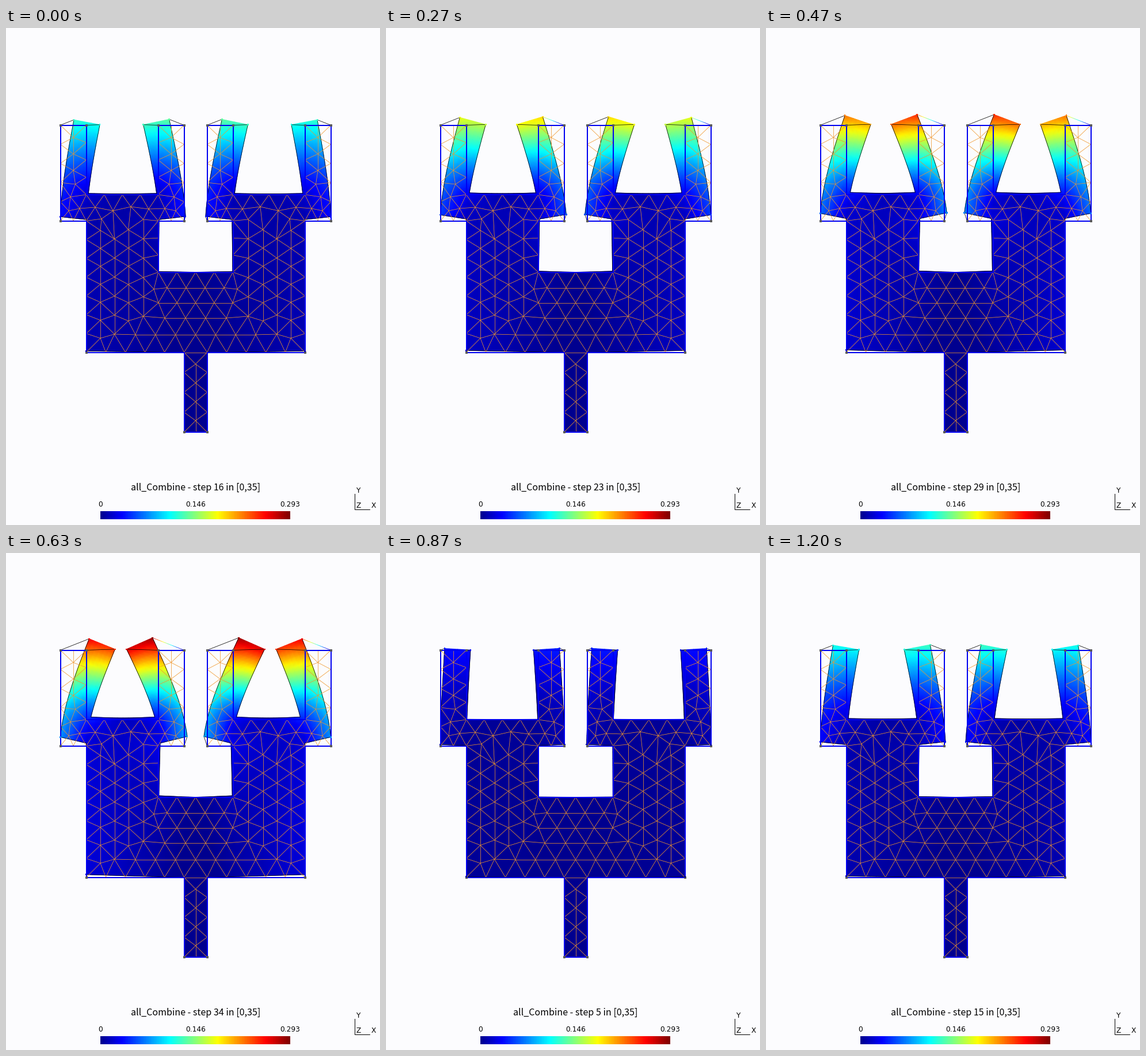
Write a matplotlib script that moves like this. It is 650 by 862 pixels and loops after 1.23 s.

```python
import numpy as np
import matplotlib.pyplot as plt
from matplotlib.animation import FuncAnimation
from matplotlib.collections import LineCollection
from matplotlib.colors import ListedColormap
from matplotlib.tri import Triangulation

W, H, DPI = 650, 862, 64
PX = 72 / DPI                      # points per pixel
MID = 329.5                        # symmetry axis
XA, XB, XC, XD = 94.5, 139.5, 264.5, 309.5
TOP, CROTCH, FOOT, HOLE, FLOOR, END = 168.5, 289, 334.5, 423.5, 562.5, 701
STEPS = 36
HAIR = .75 * PX                    # thin line width

# Left half of the contour, split at the tips of the prongs
PIECES = [
    [(XD, FLOOR), (XB, FLOOR), (XB, FOOT), (XA, FOOT), (XA, TOP)],
    [(XB, TOP), (XB, CROTCH), (XC, CROTCH), (XC, TOP)],
    [(XD, TOP), (XD, FOOT), (XC, FOOT), (XC, HOLE), (MID, HOLE)],
]
# Blocks of the left half: x0, x1, y0, y1, columns, rows
BLOCKS = [
    (XA, XB, TOP, FOOT, 6, 22),
    (XC, XD, TOP, FOOT, 6, 22),
    (XB, XC, CROTCH, FLOOR, 12, 24),
    (XC, MID, HOLE, FLOOR, 5, 8),
    (XD, MID, FLOOR, END, 1, 4),
]


def rainbow_map():
    """Piecewise linear dark blue, blue, cyan, yellow, red, dark red."""
    v = np.linspace(1 / 64, 1, 256)
    ramps = [1.5 - np.abs(4 * v - c) for c in (3, 2, 1)]
    return ListedColormap(np.clip(np.column_stack(ramps), 0, 1))


def mirror(pts, axis=MID):
    pts = np.array(pts, float)
    pts[..., 0] = 2 * axis - pts[..., 0]
    return pts


def both(pts):
    return np.vstack([np.array(pts, float), mirror(pts)])


def field(pts):
    """Displacement in pixels per load step."""
    x, y = np.asarray(pts, float).T
    side = np.where(x <= MID, 1, -1)
    x = np.where(x <= MID, x, 2 * MID - x)
    h = FOOT - y
    k = np.clip(h, 0, 166)
    bend = .1057 * k + .00176 * k**2 - 3.51e-6 * k**3
    turn = .233 + .167 * k / 166
    lift = 4.8 * (1 - .65 * (k / 166)**2)
    s = np.clip((x - XB) / (XC - XB), 0, 1)
    left = np.clip(XB - x, 0, None)
    right = np.clip(x - XC, 0, None) * (h >= 0)
    ux = (1 - s) * bend + s * (3.5 - 1.17 * bend)
    ux = ux + .045 * right * np.clip(1 - k / 100, 0, 1)
    uy = -lift * (1 - .35 * np.sin(np.pi * s)) - turn * (left + 1.1 * right)
    # the body settles towards the clamped stem
    q = 1 - np.clip(-h / (FLOOR - FOOT), 0, 1)
    fade = np.where(h >= 0, 1, np.clip((MID - x) / (MID - XC), 0, 1))
    edge = -4.8 * np.clip((XD - x) / 170, 0, 1)**1.1
    ux = ux * q**2 * fade
    uy = edge + (uy - edge) * q**2 * fade
    return np.column_stack([side * ux, uy]) / 34


def fill_grid():
    pts, tris, start = [], [], 0
    for x0, x1, y0, y1, nx, ny in BLOCKS:
        gx, gy = np.meshgrid(np.linspace(x0, x1, nx + 1),
                             np.linspace(y0, y1, ny + 1))
        block = np.column_stack([gx.ravel(), gy.ravel()])
        ids = np.arange(len(block)).reshape(ny + 1, nx + 1)
        a, b, c, d = (i.ravel() for i in (ids[:-1, :-1], ids[:-1, 1:],
                                          ids[1:, 1:], ids[1:, :-1]))
        cells = np.vstack([np.column_stack([a, b, c]),
                           np.column_stack([a, c, d])])
        for part in (block, mirror(block)):
            pts.append(part)
            tris.append(cells + start)
            start += len(part)
    return np.vstack(pts), np.vstack(tris)


def column(x, y0, y1, n):
    return [(x, y) for y in np.linspace(y0, y1, n)]


def row(y, x0, x1, n):
    return [(x, y) for x in np.linspace(x0, x1, n)]


def mesh_edges():
    prong = (column(XA, TOP, FOOT, 6) + column(XB, TOP, CROTCH, 5)
             + column(117, 190, 247, 3)
             + [(117, TOP), (117, FOOT), (XB, FOOT), (120.5, 271),
                (112, 293), (109, 317), (128, 313)])
    body = (row(CROTCH, XB, XC, 5) + row(FLOOR, XB, XD, 6)
            + [(155, 311), (186, 317), (217, 310), (248, 314), (166, 331)]
            + column(XB, FOOT, FLOOR, 8) + column(164, 351, 538, 7)
            + column(188.5, 366, 531, 6) + column(212.5, 350, 508, 6)
            + column(238.5, 332, 500, 6) + column(XC, FOOT, HOLE, 4)
            + row(HOLE, XC, MID, 3) + [(257, 453)] + row(450.5, 280, 313, 2)
            + row(476.5, 265, MID, 3) + row(503, 276, 312, 2)
            + row(532, 225, MID, 4))
    stem = column(XD, FLOOR, END, 5) + column(MID, 583, 681, 4)
    stem += [(MID, END)]
    half = np.vstack([prong, mirror(prong, (XB + XC) / 2), body, stem])
    pts = np.unique(both(half), axis=0)
    tri = Triangulation(*pts.T)
    cx, cy = pts[tri.triangles].mean(axis=1).T
    cx = np.minimum(cx, 2 * MID - cx)
    inside = np.zeros(len(cx), bool)
    for x0, x1, y0, y1, _, _ in BLOCKS:
        inside |= (cx >= x0) & (cx <= x1) & (cy >= y0) & (cy <= y1)
    tri.set_mask(~inside)
    return pts[tri.edges]


def densify(corners, n=14):
    c = np.array(corners, float)
    t = np.linspace(0, 1, n)[:, None]
    return np.vstack([a + (b - a) * t for a, b in zip(c[:-1], c[1:])])


# Load step shown at each time
CHANGES = np.array([70 + 10 * round(10 * k / 3) for k in range(16)]
                   + [600 + 10 * round(10 * k / 3) for k in range(19)])


def step_at(ms):
    return int(16 + np.sum(CHANGES <= ms)) % STEPS


fig = plt.figure(figsize=(W / DPI, H / DPI), dpi=DPI, facecolor="#fcfcfe")
ax = fig.add_axes([0, 0, 1, 1])
ax.axis("off")
jet = rainbow_map()

# Deformed solution
nodes, cells = fill_grid()
shift = field(nodes)
size = np.hypot(*shift.T)
peak = size.max() * (STEPS - 1)
tri = Triangulation(*nodes.T, cells)
fill = ax.tripcolor(tri, size * 0, shading="gouraud", cmap=jet,
                    vmin=0, vmax=1, zorder=1)

# Deformed border, with links from each corner to its rest position
borders = [densify(p) for p in PIECES]
borders += [mirror(b) for b in borders]
border_shift = [field(b) for b in borders]
corners = both([(XB, TOP), (XC, TOP), (XA, FOOT), (XD, FOOT), (XB, FLOOR),
                (XA, TOP), (XD, TOP)])
corner_shift = field(corners)
corner_size = np.hypot(*corner_shift.T) / peak
shaded = [6, 12]                   # outer tips of the right-hand prongs
black = LineCollection([], colors="black", linewidths=HAIR, zorder=2)
rainbow = LineCollection([], linewidths=HAIR, zorder=2)
ax.add_collection(black)
ax.add_collection(rainbow)
dots = ax.scatter(*corners.T, c=corner_size, s=(2.6 * PX)**2, marker="s",
                  cmap=jet, vmin=0, vmax=1, linewidths=0, zorder=6)

# Mesh and contour at rest
ax.add_collection(LineCollection(mesh_edges(), colors="#f0962d",
                                 linewidths=HAIR, zorder=3))
left = [(XD, END)] + sum(PIECES, [])
shape = np.vstack([left, mirror(left[::-1]), left[:1]])
ax.plot(*shape.T, color="#0000f0", lw=2 * PX, aa=False, zorder=4,
        solid_joinstyle="miter")
marks = both([(XA, TOP), (XB, TOP), (XC, TOP), (XD, TOP), (XA, FOOT),
              (XD, FOOT), (XB, FLOOR), (XD, END)])
ax.scatter(*marks.T, s=(4 * PX)**2, marker="s", color="#5a5a5a",
           linewidths=0, zorder=5)

# Colour scale, title and axes
ax.imshow(np.linspace(0, 1, 256)[None], cmap=jet, aspect="auto",
          extent=(164, 493.5, 852, 838))


def label(x, y, text, px=12.2, font="DejaVu Sans"):
    return ax.text(x, y, text, fontsize=px * PX, family=font, color="black",
                   ha="center", va="baseline")


title = label(329.3, 802, "", 16, "Noto Sans CJK JP")
for x, text in ((164.5, "0"), (329.3, "0.146"), (493.7, "0.293")):
    label(x, 829.5, text)
for x, y, text in ((612, 805.5, "Y"), (612.5, 832, "Z"), (639, 832, "X")):
    label(x, y, text)
ax.plot([605.5, 605.5, 632], [808, 834.5, 834.5], color="black", lw=PX,
        aa=False)
ax.set_xlim(0, W)
ax.set_ylim(H, 0)


def draw(i):
    step = step_at(10 * i)
    tri.x, tri.y = (nodes + shift * step).T
    fill.set_array(size * step / peak)

    moved = corners + corner_shift * step
    dots.set_offsets(moved)
    dots.set_array(corner_size * step)
    coloured = shaded if step >= 20 else []
    lines = [b + u * step for b, u in zip(borders, border_shift)]
    lines += [np.array([corners[j], moved[j]]) for j in range(len(corners))
              if j not in coloured]
    black.set_segments(lines)

    t = np.linspace(0, 1, 17)
    parts, tints = [], []
    for j in coloured:
        path = corners[j] + (moved[j] - corners[j]) * t[:, None]
        parts += [path[n:n + 2] for n in range(16)]
        tints += list(jet(corner_size[j] * step * t[:-1]))
    rainbow.set_segments(parts)
    rainbow.set_color(tints or "black")

    title.set_text(f"all_Combine - step {step} in [0,35]")
    return []


anim = FuncAnimation(fig, draw, frames=123, interval=10, repeat=True,
                     repeat_delay=0, blit=False)
plt.show()
```
